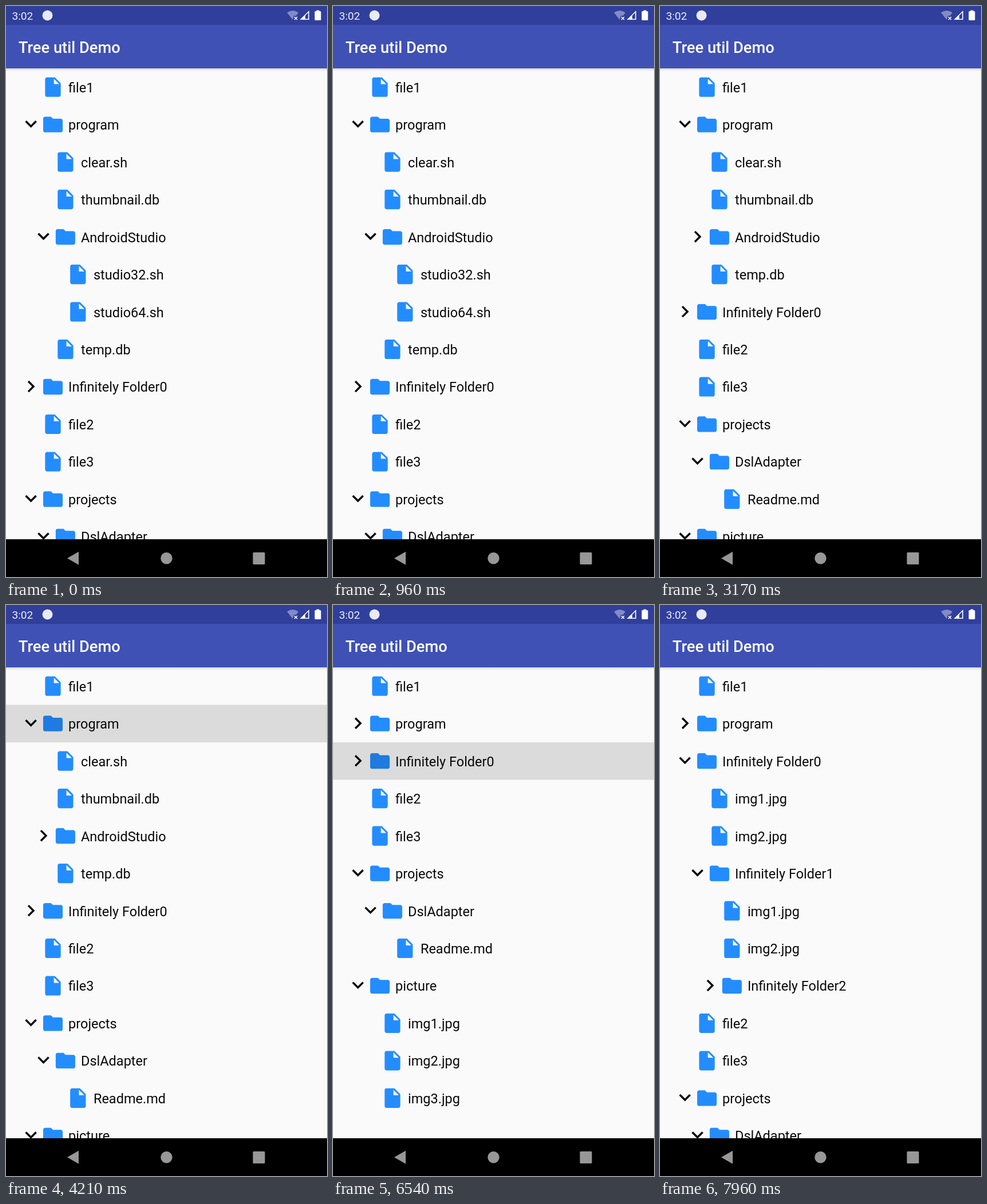
An HTML page with a canvas that plays this animation: 561 px wide and 998 px high, repeating every 8 s.

```html
<!DOCTYPE html>
<html lang="en">
<head>
<meta charset="utf-8">
<title>Tree util Demo</title>
<style>
  html, body { margin: 0; width: 100%; height: 100%; overflow: hidden; background: #fafafa; }
  canvas { display: block; }
</style>
</head>
<body>
<canvas id="stage" width="561" height="998"></canvas>
<script>
const ctx = document.getElementById('stage').getContext('2d');
const WIDTH = 561, LIST_TOP = 109, LIST_BOTTOM = 932;
const ROW = 65.47, INDENT = 21.9, ICON_SCALE = 1.705;
const LOOP = 8000;

// One space per level; "+" is an open folder, "-" a closed one.
const TREE = `
file1
+program
 clear.sh
 thumbnail.db
 +AndroidStudio
  studio32.sh
  studio64.sh
 temp.db
-Infinitely Folder0
 img1.jpg
 img2.jpg
 -Infinitely Folder1
  img1.jpg
  img2.jpg
  -Infinitely Folder2
file2
file3
+projects
 +DslAdapter
  Readme.md
+picture
 img1.jpg
 img2.jpg
 img3.jpg`;

const TAPS = [
  { name: 'AndroidStudio', press: 1740, release: 2460 },
  { name: 'program', press: 3800, release: 5030 },
  { name: 'Infinitely Folder0', press: 5632, release: 6640 },
  { name: 'Infinitely Folder1', press: 7030, release: 7450 },
];
const TOUCH_X = 218;
const FADE = 120, MOVE = 250;

const ICONS = {
  file: new Path2D('M6 2c-1.1 0-2 .9-2 2v16c0 1.1.9 2 2 2h12c1.1 0 2-.9 2-2V8l-6-6H6zm7 7V3.5L18.5 9H13z'),
  folder: new Path2D('M10 4H4c-1.1 0-2 .9-2 2v12c0 1.1.9 2 2 2h16c1.1 0 2-.9 2-2V8c0-1.1-.9-2-2-2h-8l-2-2z'),
  open: new Path2D('M7.41 7.84L12 12.42l4.59-4.58L18 9.25l-6 6-6-6z'),
  closed: new Path2D('M8.59 16.34l4.58-4.59-4.58-4.59L10 5.75l6 6-6 6z'),
};

const clamp = v => Math.min(1, Math.max(0, v));
const ease = v => { const p = clamp(v); return p * p * (3 - 2 * p); };
const mix = (a, b, p) => a + (b - a) * p;

function parseTree(text) {
  const ancestors = [];
  return text.trim().split('\n').map(line => {
    const [, pad, mark, name] = line.match(/^( *)([+-]?)(.*)$/);
    const level = pad.length;
    const row = { name, level, folder: mark !== '', open: mark === '+', parent: ancestors[level - 1] };
    ancestors[level] = row;
    return row;
  });
}

const rows = parseTree(TREE);

// Which folders are open and where each row sits after a number of taps.
function layout(tapCount) {
  const open = new Set(rows.filter(r => r.open));
  for (const tap of TAPS.slice(0, tapCount)) {
    const row = rows.find(r => r.name === tap.name);
    if (!open.delete(row)) open.add(row);
  }
  const shown = row => !row.parent || (open.has(row.parent) && shown(row.parent));
  const y = new Map();
  rows.filter(shown).forEach((row, i) => y.set(row, LIST_TOP + i * ROW));
  return { open, y };
}

const layouts = [0, ...TAPS.map((_, i) => i + 1)].map(layout);

function icon(path, cx, cy, color, alpha = 1) {
  ctx.save();
  ctx.globalAlpha *= alpha;
  ctx.translate(cx, cy);
  ctx.scale(ICON_SCALE, ICON_SCALE);
  ctx.translate(-12, -12);
  ctx.fillStyle = color;
  ctx.fill(path, 'evenodd');
  ctx.restore();
}

function text(value, x, y, font, color) {
  ctx.font = font + ' Roboto, sans-serif';
  ctx.fillStyle = color;
  ctx.fillText(value, x, y);
}

function polygon(color, ...points) {
  ctx.fillStyle = color;
  ctx.beginPath();
  points.forEach(([x, y]) => ctx.lineTo(x, y));
  ctx.fill();
}

function circle(x, y, r, color) {
  ctx.fillStyle = color;
  ctx.beginPath();
  ctx.arc(x, y, r, 0, 2 * Math.PI);
  ctx.fill();
}

function rect(x, y, w, h, color) {
  ctx.fillStyle = color;
  ctx.fillRect(x, y, w, h);
}

function drawRow(row, y, alpha, openness) {
  const cx = 82 + row.level * INDENT, cy = y + ROW / 2;
  ctx.globalAlpha = alpha;
  if (row.folder) {
    icon(ICONS.open, cx - 38.4, cy, '#000', openness);
    icon(ICONS.closed, cx - 38.4, cy, '#000', 1 - openness);
  }
  icon(row.folder ? ICONS.folder : ICONS.file, cx, cy, '#238dff');
  text(row.name, cx + 27.1, cy + 9, '23.5px', '#0a0a0a');
  ctx.globalAlpha = 1;
}

function drawRipple(tap, y, t) {
  const age = t - tap.press;
  const alpha = 0.125 * clamp(age / 75) * (1 - clamp((t - tap.release) / 150));
  if (alpha <= 0) return;
  const grow = ease(age / 225);
  const radius = mix(WIDTH * 0.3, Math.hypot(WIDTH, ROW) / 2 + 1, grow);
  ctx.save();
  ctx.beginPath();
  ctx.rect(0, y, WIDTH, ROW);
  ctx.clip();
  circle(mix(TOUCH_X, WIDTH / 2, grow), y + ROW / 2, radius, `rgba(0,0,0,${alpha})`);
  ctx.restore();
}

function drawList(t) {
  const done = TAPS.filter(tap => t >= tap.release).length;
  const after = layouts[done], before = layouts[Math.max(0, done - 1)];
  const since = done ? t - TAPS[done - 1].release : Infinity;
  const closing = after.y.size < before.y.size;
  const move = ease((since - (closing ? FADE : 0)) / MOVE);
  const fadeOut = 1 - ease(since / FADE);
  const fadeIn = ease((since - MOVE) / FADE);
  const rowY = row => mix(before.y.get(row), after.y.get(row), move);

  ctx.save();
  ctx.beginPath();
  ctx.rect(0, LIST_TOP, WIDTH, LIST_BOTTOM - LIST_TOP);
  ctx.clip();
  for (const row of rows) {
    const was = before.y.has(row), is = after.y.has(row);
    const openness = mix(+before.open.has(row), +after.open.has(row), move);
    if (was && is) drawRow(row, rowY(row), 1, openness);
    else if (was) drawRow(row, before.y.get(row), fadeOut, openness);
    else if (is) drawRow(row, after.y.get(row), fadeIn, openness);
  }
  for (const tap of TAPS) {
    const row = rows.find(r => r.name === tap.name);
    if (t >= tap.press && after.y.has(row)) drawRipple(tap, after.y.get(row), t);
  }
  const shadow = ctx.createLinearGradient(0, LIST_TOP, 0, LIST_TOP + 5);
  shadow.addColorStop(0, 'rgba(0,0,0,.13)');
  shadow.addColorStop(1, 'rgba(0,0,0,0)');
  rect(0, LIST_TOP, WIDTH, 5, shadow);
  ctx.restore();
}

function drawBars() {
  rect(0, 0, WIDTH, 33, '#303f9b');
  rect(0, 33, WIDTH, LIST_TOP - 33, '#3f51b5');
  text('Tree util Demo', 21.8, 81.5, '500 27.3px', '#fff');
  text('3:02', 10.5, 24, '19.1px', '#eef0fa');
  circle(72.5, 16.5, 9, '#e8eaf6');

  // Wi-Fi without a connection
  ctx.fillStyle = 'rgba(255,255,255,.4)';
  ctx.beginPath();
  ctx.moveTo(501, 24);
  ctx.lineTo(491, 11.5);
  ctx.quadraticCurveTo(501, 4.5, 511, 11.5);
  ctx.lineTo(507, 17);
  ctx.lineTo(503, 17);
  ctx.fill();
  ctx.strokeStyle = '#fff';
  ctx.lineWidth = 1.6;
  ctx.beginPath();
  ctx.moveTo(504, 19); ctx.lineTo(509, 24);
  ctx.moveTo(509, 19); ctx.lineTo(504, 24);
  ctx.stroke();

  // Mobile signal
  ctx.beginPath();
  ctx.moveTo(515.5, 23.2); ctx.lineTo(529, 9.8); ctx.lineTo(529, 23.2);
  ctx.closePath();
  ctx.stroke();
  polygon('#fff', [514, 24], [523, 15], [523, 24]);

  // Battery
  rect(542.5, 7.5, 5, 3, '#fff');
  ctx.fillStyle = '#fff';
  ctx.beginPath();
  ctx.roundRect(539.5, 9, 11, 16, 1.5);
  ctx.fill();

  rect(0, LIST_BOTTOM, WIDTH, 998 - LIST_BOTTOM, '#000');
  polygon('#979797', [107, 965.3], [127, 953.8], [127, 976.8]);
  circle(280.5, 965.3, 10.2, '#979797');
  ctx.fillStyle = '#979797';
  ctx.beginPath();
  ctx.roundRect(431.5, 955, 21, 21, 1.5);
  ctx.fill();
}

function draw(now) {
  rect(0, 0, WIDTH, 998, '#fafafb');
  drawList(now % LOOP);
  drawBars();
  requestAnimationFrame(draw);
}

requestAnimationFrame(draw);
</script>
</body>
</html>
```
